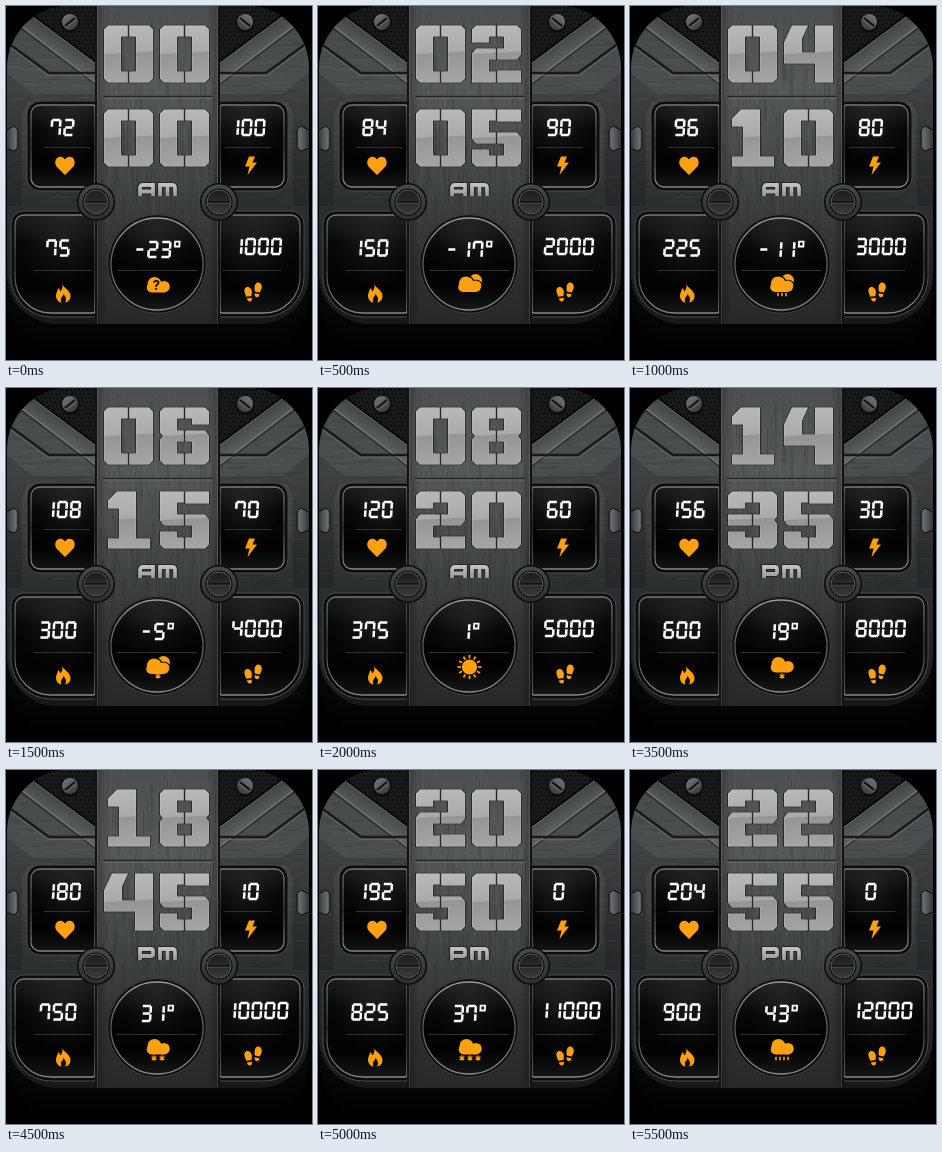
Animation of 306 by 354 pixels, one loop 6000 ms. Source, as an HTML page with a canvas:

```html
<!DOCTYPE html>
<html lang="en">
<head>
<meta charset="utf-8">
<title>Watch face</title>
<style>
html, body { margin: 0; width: 100%; height: 100%; overflow: hidden; background: #000; }
canvas { display: block; width: 306px; height: 354px; }
</style>
</head>
<body>
<canvas id="face" width="306" height="354"></canvas>
<script>
const W = 306, H = 354, STEP = 500, STEPS = 12, ORANGE = '#ffa010';
const view = document.getElementById('face').getContext('2d');
const base = document.createElement('canvas');
base.width = W; base.height = H;
let g = base.getContext('2d');

let seed = 7;
const rnd = () => (seed = (seed * 16807) % 2147483647) / 2147483647;

function ramp(x0, y0, x1, y1, ...stops) {
  const r = g.createLinearGradient(x0, y0, x1, y1);
  stops.forEach(([p, c]) => r.addColorStop(p, c));
  return r;
}
function glow(x, y, r, a) {
  const s = g.createRadialGradient(x, y, 0, x, y, r);
  s.addColorStop(0, `rgba(255,255,255,${a})`);
  s.addColorStop(1, 'rgba(255,255,255,0)');
  return s;
}
function line(d, color, width = 1) {
  g.strokeStyle = color; g.lineWidth = width;
  g.stroke(new Path2D(d));
}
function fill(d, color) {
  g.fillStyle = color;
  g.fill(new Path2D(d));
}
function disc(x, y, r, color) {
  g.fillStyle = color;
  g.beginPath(); g.arc(x, y, r, 0, 7); g.fill();
}
function ring(x, y, r, color, width = 1) {
  g.strokeStyle = color; g.lineWidth = width;
  g.beginPath(); g.arc(x, y, r, 0, 7); g.stroke();
}
function box(x, y, w, h, r) {
  const p = new Path2D();
  p.roundRect(x, y, w, h, r);
  return p;
}
function shifted(x, y, draw) {
  g.save();
  g.translate(x, y);
  draw();
  g.restore();
}

// ---------- static face ----------
function panel(x, y, w, h, r) {
  const grow = n => box(x - n, y - n, w + 2 * n, h + 2 * n, r.map(v => v + n));
  g.fillStyle = '#0b0c0c'; g.fill(grow(4));
  g.strokeStyle = '#4a4d4d'; g.lineWidth = 1; g.stroke(grow(4));
  g.fillStyle = ramp(0, y, 0, y + h, [0, '#1b1c1c'], [.3, '#060606'], [.75, '#020202'], [1, '#141515']);
  g.fill(grow(0));
  g.fillStyle = glow(x + w * .6, y + h * .26, w * .55, .08); g.fill(grow(0));
  g.strokeStyle = ramp(x, y, x, y + h, [0, '#777a7a'], [.5, '#3a3c3c'], [1, '#858888']);
  g.lineWidth = 1.3; g.stroke(grow(0));
}

function side() {
  fill('M0 0H90V318H0Z', ramp(0, 0, 0, 318, [0, '#464949'], [.25, '#4b4e4e'], [.5, '#343737'], [.75, '#252828'], [1, '#171919']));
  for (let i = 0; i < 150; i++) {
    const x = rnd() * 80, y = 20 + rnd() * 180, n = 8 + rnd() * 22;
    line(`M${x} ${y}h${n}`, rnd() < .5 ? 'rgba(255,255,255,.05)' : 'rgba(0,0,0,.13)', .8);
  }
  // mesh corner and strut
  fill('M14 0H90V56Z', '#191b1b');
  for (let y = 2; y < 54; y += 4)
    for (let x = 18 + y * 1.36; x < 89; x += 4) disc(x, y, 1, '#090a0a');
  fill('M14 0L90 56V77L2 10Z', ramp(50, 26, 40, 42, [0, '#414444'], [1, '#5c5f5f']));
  line('M14 0L90 56', '#0a0b0b', 2.5);
  line('M12 0L90 58', '#686b6b', 1);
  line('M2 10L90 77', '#747777', 1.2);
  line('M0 11L90 79', 'rgba(0,0,0,.4)', 1.5);
  // grooves
  line('M2 37L43 67H90', '#191b1b', 2.5);
  line('M2 39.5L42 69.3H90', '#686b6b', 1);
  fill('M0 66L26 88H90V96H22L16 108V200H0Z', 'rgba(0,0,0,.15)');
  // side nub
  fill('M0 124L8 120L12 124V141L8 145L0 142Z', ramp(0, 0, 13, 0, [0, '#333636'], [.7, '#686b6b'], [1, '#444747']));
  line('M0 124L8 120L12 124V141L8 145L0 142', '#0d0e0e', 1);
  // screw
  disc(64, 17, 9.5, '#0c0d0d');
  disc(64, 16, 8, ramp(58, 8, 70, 24, [0, '#777a7a'], [1, '#333636']));
  line('M59 20L69 12', '#111', 2.2);
  line('M60 21.5L70 13.5', '#777', .7);

  panel(25, 99, 64, 82, [9, 2, 2, 9]);
  panel(9, 209, 80, 98, [9, 2, 2, 36]);
  line('M38 141.5H84M28 264.5H86', '#303232', 1);
}

function knob() {
  disc(90, 196, 19, '#0a0b0b');
  disc(90, 196, 17.5, ramp(0, 178, 0, 214, [0, '#484b4b'], [1, '#2b2e2e']));
  disc(90, 196, 13.5, '#080909');
  disc(90, 196, 11.5, ramp(0, 184, 0, 208, [0, '#1b1d1d'], [1, '#383b3b']));
  ring(90, 196, 12, '#5c5f5f', 1);
  line('M79 196H101', '#0d0e0e', 1.5);
  line('M79 197.3H101', '#515454', .8);
}

function mirrored(draw) {
  draw();
  g.save();
  g.translate(303, 0); g.scale(-1, 1);
  draw();
  g.restore();
}

const HEART = 'M59 169L50.5 160.5C47 155 51.5 149.5 56 151Q58 151.6 59 153.5Q60 151.6 62 151C66.5 149.5 71 155 67.5 160.5Z';
const BOLT = 'M243 150.5H249L246.5 156.5H251L241.5 169L243.5 160.5H239Z';
const FLAME = 'M56 277.5C57 282 64.5 284 64.5 290C64.5 294 62 296 59 296.5C61.5 293 59 290 57.5 288C57 291 53.5 292 55.5 296.5C52 296 50 293 50 289.5C50 286.5 52 285 52 282C54 283.5 54 284.5 54 285.5C56.5 283.5 57 281 56 277.5Z';

function sole(x, y, tilt) {
  g.save();
  g.translate(x, y); g.rotate(tilt);
  fill('M-3.5 -3C-4 -9 3 -9 3.7 -3.5C4 -1 3 0 2.8 2L-2.4 2Q-3.3 0 -3.5 -3ZM-2.3 3.7H2.7C3.5 8 -1.8 8.5 -2.3 3.7Z', ORANGE);
  g.restore();
}

function drawBase() {
  g.fillStyle = '#000'; g.fillRect(0, 0, W, H);
  g.fillStyle = ramp(0, 300, 0, 350, [0, '#060707'], [1, '#000']);
  g.fill(box(1, 260, 302, 88, [0, 0, 58, 58]));
  g.save();
  g.clip(box(1, 0, 302, 318, [62, 62, 50, 50]));
  mirrored(side);

  // centre column
  fill('M90 0H213V318H90Z', ramp(0, 0, 0, 318, [0, '#4c4f4f'], [.25, '#565959'], [.55, '#424545'], [.8, '#2f3131'], [1, '#272929']));
  for (let i = 0; i < 320; i++) {
    const x = 91 + rnd() * 121, y = rnd() * 200;
    line(`M${x} ${y}v${8 + rnd() * 35}`, rnd() < .5 ? 'rgba(255,255,255,.05)' : 'rgba(0,0,0,.14)', .8);
  }
  fill('M90 0H213V318H90Z', ramp(90, 0, 213, 0, [0, 'rgba(0,0,0,.25)'], [.1, 'rgba(0,0,0,0)'], [.9, 'rgba(0,0,0,0)'], [1, 'rgba(0,0,0,.25)']));
  line('M90 0V318M213 0V318', '#101111', 2);
  line('M91.5 0V318M211.5 0V318', 'rgba(255,255,255,.13)', 1);
  line('M97 90.5H207', '#222424', 1.5);
  line('M97 92H207', '#6a6d6d', 1);

  mirrored(knob);

  // centre dial
  disc(151, 258, 50, '#111212');
  ring(151, 258, 49.5, '#444747', 1);
  disc(151, 258, 46, ramp(0, 212, 0, 304, [0, '#1c1d1d'], [.35, '#060606'], [.75, '#020202'], [1, '#161717']));
  disc(151, 258, 45, glow(151, 232, 36, .07));
  ring(151, 258, 46, ramp(0, 212, 0, 304, [0, '#999c9c'], [.5, '#555858'], [1, '#888b8b']), 1.3);
  line('M111 264.5H191', '#303232', 1);
  g.restore();

  fill(HEART, ORANGE);
  fill(BOLT, ORANGE);
  fill(FLAME, ORANGE);
  sole(242.5, 288.5, -.15);
  sole(251.5, 284, .2);
}

// ---------- large stencil digits, 49 x 57 cell ----------
const mx = p => p.map((v, i) => i % 2 ? v : 49 - v);
const my = p => p.map((v, i) => i % 2 ? 57 - v : v);
const half = [4, 0, 23.7, 0, 23.7, 11, 17, 11, 17, 46, 23.7, 46, 23.7, 57, 4, 57, 0, 53, 0, 4];
const half8 = [4, 0, 23.7, 0, 23.7, 11, 17, 11, 17, 23, 23.7, 23, 23.7, 34, 17, 34, 17, 46, 23.7, 46, 23.7, 57, 4, 57, 0, 53, 0, 32, 3, 28.5, 0, 25, 0, 4];
const stub = [4, 0, 23.7, 0, 23.7, 11, 17, 11, 17, 17, 0, 17, 0, 4];
const hook = [25.3, 0, 45, 0, 49, 4, 49, 29, 45, 34, 25.3, 34, 25.3, 23, 32, 23, 32, 11, 25.3, 11];
const foot = [23.7, 23, 4, 23, 0, 28, 0, 57, 23.7, 57, 23.7, 46, 17, 46, 17, 34, 23.7, 34];
const toe = [25.3, 45, 49, 45, 49, 57, 25.3, 57];
const two = [stub, hook, foot, toe];
const BIG = {
  0: [half, mx(half)],
  1: [[13, 0, 32, 0, 32, 47, 46, 47, 46, 57, 4, 57, 4, 47, 15, 47, 15, 17, 4, 17, 4, 9]],
  2: two,
  3: [stub, my(stub), mx(half8), [0, 23, 23.7, 23, 23.7, 34, 0, 34]],
  4: [[8, 0, 24, 0, 18, 13, 18, 27, 31, 27, 31, 0, 49, 0, 49, 57, 31, 57, 31, 38, 0, 38, 0, 17]],
  5: two.map(my),
  6: [half8, mx(stub), my(hook)],
  8: [half8, mx(half8)]
};
const polys = list => list.map(p => 'M' + p.join(' ') + 'Z').join('');

function big(n, x, y) {
  const d = polys(BIG[n]);
  g.save();
  g.translate(x, y);
  g.lineJoin = 'round';
  line(d, 'rgba(15,15,15,.65)', 1.6);
  fill(d, ramp(0, 0, 3, 57, [0, '#b8baba'], [.49, '#a9abab'], [.51, '#949696'], [1, '#a4a6a6']));
  g.clip(new Path2D(d));
  line(d, 'rgba(225,225,225,.3)', 1.2);
  g.restore();
}
function pair(n, y) {
  const s = String(n).padStart(2, '0');
  big(s[0], 98, y);
  big(s[1], 154, y);
}

const HALF_DAY = {
  A: 'M2 13V5Q2 2 5 2H15V13M2 8.5H15',
  P: 'M2 13V2H13Q15 2 15 4V7Q15 9 13 9H2'
};
function halfDay(letter) {
  const d = HALF_DAY[letter] + 'M22 13V2H34Q37 2 37 5V13M29.5 2V13';
  shifted(132, 177, () => {
    line(d, 'rgba(0,0,0,.6)', 5.5);
    line(d, ramp(0, 0, 0, 13, [0, '#c4c6c6'], [1, '#979999']), 3.8);
  });
}

// ---------- small segment digits ----------
const SEG = {
  a: 'M1.5 1.4H9.5', b: 'M9.6 1.8V8.3', c: 'M9.6 9.7V16.2', d: 'M1.5 16.6H9.5',
  e: 'M1.4 9.7V16.2', f: 'M1.4 1.8V8.3', g: 'M2 9H9', o: 'M1.3 1.2H5.8V6H1.3Z'
};
const LCD = {
  0: 'abcdef', 1: 'bc', 2: 'abged', 3: 'abgcd', 4: 'fgbc', 5: 'afgcd',
  6: 'afgedc', 7: 'fabc', 8: 'abcdefg', 9: 'abcdfg', '-': 'g', '°': 'o'
};
function lcd(text, cx, y) {
  const chars = [...String(text)];
  const step = c => c === '°' ? 8 : 13;
  let x = cx - chars.reduce((sum, c) => sum + step(c), 0) / 2;
  for (const c of chars) {
    g.save();
    g.transform(1, 0, -.06, 1, x + 1.4, y);
    for (const s of LCD[c]) line(SEG[s], '#fff', c === '°' ? 1.8 : 2.5);
    g.restore();
    x += step(c);
  }
}

// ---------- weather ----------
function cloud() {
  disc(148.5, 276, 7, ORANGE);
  disc(158, 278.7, 5.8, ORANGE);
  g.fillRect(146, 277, 12, 7.5);
  disc(145.7, 279.5, 5, ORANGE);
}
function sun(x, y, r, len) {
  disc(x, y, r, ORANGE);
  for (let i = 0; i < 12; i++) {
    const a = i * Math.PI / 6, c = Math.cos(a), s = Math.sin(a);
    line(`M${x + c * (r + 1)} ${y + s * (r + 1)}L${x + c * (r + len)} ${y + s * (r + len)}`, ORANGE, 1.8);
  }
}
function sunCloud() {
  disc(157.5, 274.5, 6.5, ORANGE);
  shifted(-.5, 1.5, () => {
    line('M141 275A8 8 0 0 1 156 273Q163 272 164.8 278', '#050505', 1.4);
    cloud();
  });
}
const spread = (n, gap, draw) => {
  for (let i = 0; i < n; i++) draw(152 + (i - (n - 1) / 2) * gap);
};
const rain = n => spread(n, 4, x => line(`M${x} 286.8v3.4`, ORANGE, 1.6));
const snow = n => spread(n, 8, x => line(`M${x} 285.2v5.6M${x - 2.4} 286.6l4.8 2.8M${x + 2.4} 286.6l-4.8 2.8`, ORANGE, 1.1));
const over = (n, kind, top = cloud) => () => { top(); kind(n); };

const WEATHER = [
  () => {
    shifted(0, 2, cloud);
    g.fillStyle = '#080808';
    g.font = 'bold 13px Inter, Arial, sans-serif';
    g.textAlign = 'center';
    g.fillText('?', 150.5, 284);
  },
  sunCloud,
  over(3, rain, sunCloud),
  over(1, snow, sunCloud),
  () => sun(151.5, 279, 7.6, 4.4),
  () => {
    disc(150, 275, 6.3, ORANGE); disc(157, 277.5, 6, ORANGE);
    shifted(-1, 3, () => {
      line('M140 278A8.3 8.3 0 0 1 156 274Q163 273 164 280', '#050505', 1.4);
      cloud();
    });
  },
  over(2, rain), over(1, snow), over(3, rain), over(2, snow), over(3, snow), over(4, rain)
];

// ---------- one state per half second ----------
function paint(k) {
  g.drawImage(base, 0, 0);
  pair(k * 2, 19.5);
  pair(k * 5, 103.5);
  halfDay(k < 6 ? 'A' : 'P');
  lcd(72 + 12 * k, 56.5, 112.5);
  lcd(Math.max(0, 100 - 10 * k), 241, 112.5);
  lcd(75 + 75 * k, 52, 233);
  lcd(1000 * (k + 1), 251, 231.5);
  lcd(6 * k - 23 + '°', 151, 234.5);
  WEATHER[k]();
}

drawBase();
g = view;
let shown = -1;
const start = performance.now();
function tick() {
  const k = Math.floor(Math.max(0, performance.now() - start) / STEP) % STEPS;
  if (k !== shown) paint(shown = k);
  requestAnimationFrame(tick);
}
tick();
</script>
</body>
</html>
```
